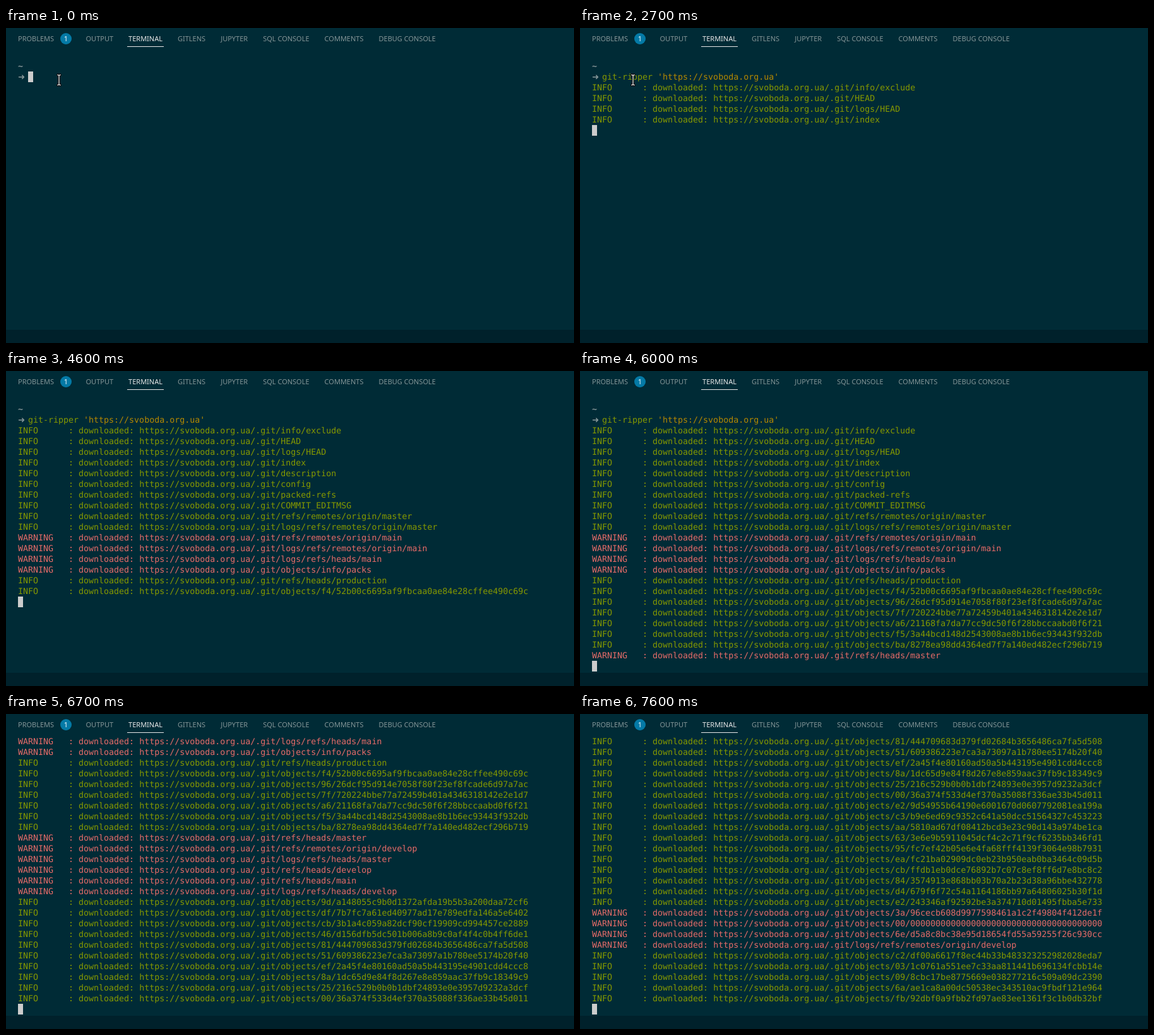
These frames come from a looping animation (900x500 px, 8000 ms). An HTML page:

```html
<!DOCTYPE html>
<html lang="en">
<head>
<meta charset="utf-8">
<title>Terminal</title>
<style>
html, body { margin: 0; width: 100%; height: 100%; overflow: hidden; background: #002b36; }
#stage { position: absolute; left: 0; top: 0; width: 900px; height: 500px; overflow: hidden; background: #002b36; }
#tabs { position: absolute; left: 19px; top: 7px; display: flex; gap: 24px; font: 11px/20px "Noto Sans", "Open Sans", sans-serif; color: #839496; white-space: nowrap; }
#tabs span:first-child { width: 83.5px; }
#tabs .on { color: #e7e7e7; }
#line { position: absolute; left: 192px; top: 29px; width: 58px; height: 1px; background: #e7e7e7; }
#badge { position: absolute; left: 86px; top: 8px; width: 18px; height: 18px; border-radius: 9px; background: #047aa6; color: #fff; font: 11px/18px "Noto Sans", sans-serif; text-align: center; }
#term { position: absolute; left: 19px; top: 35px; font: 13.3px/17px "DejaVu Sans Mono", "Noto Sans Mono", monospace; font-variant-ligatures: none; text-rendering: geometricPrecision; white-space: pre; }
.row { position: absolute; left: 0; top: 0; height: 17px; padding-top: 1px; }
.info { color: #859900; }
.warn { color: #e76b68; }
.str { color: #b58900; }
.hint { color: #859a9f; }
.dir { color: #839496; font-weight: bold; }
.arrow { display: inline-block; width: 16px; height: 17px; vertical-align: top; color: #839496; font-family: "DejaVu Sans", sans-serif; }
#caret { position: absolute; width: 8px; height: 17px; padding-top: 1px; box-sizing: border-box; background: #ccc; color: #002b36; }
#foot { position: absolute; left: 0; top: 479px; width: 900px; height: 21px; background: #00212b; }
#mouse { position: absolute; left: 78px; top: 72px; }
</style>
</head>
<body>
<div id="stage">
  <div id="tabs"><span>PROBLEMS</span><span>OUTPUT</span><span class="on">TERMINAL</span><span>GITLENS</span><span>JUPYTER</span><span>SQL CONSOLE</span><span>COMMENTS</span><span>DEBUG CONSOLE</span></div>
  <div id="badge">1</div>
  <div id="line"></div>
  <div id="term"></div>
  <div id="foot"></div>
  <svg id="mouse" width="12" height="21" fill="none" stroke-linecap="round">
    <defs><path id="beam" d="M3.5 2.5H5L6 3.5L7 2.5H8.5M6 3.5V17.5M3.5 18.5H5L6 17.5L7 18.5H8.5"/></defs>
    <use href="#beam" stroke="#000" stroke-width="3"/>
    <use href="#beam" stroke="#fff" stroke-width="1.2"/>
  </svg>
</div>
<script>
const LOOP = 8000, ROWS = 26, ROW_H = 17, CHAR_W = 8;
const SITE = 'https://svoboda.org.ua';

// Paths fetched from .git/; a leading "!" marks a warning.
const paths = `info/exclude
HEAD
logs/HEAD
index
description
config
packed-refs
COMMIT_EDITMSG
refs/remotes/origin/master
logs/refs/remotes/origin/master
!refs/remotes/origin/main
!logs/refs/remotes/origin/main
!logs/refs/heads/main
!objects/info/packs
refs/heads/production
f4/52b00c6695af9fbcaa0ae84e28cffee490c69c
96/26dcf95d914e7058f80f23ef8fcade6d97a7ac
7f/720224bbe77a72459b401a4346318142e2e1d7
a6/21168fa7da77cc9dc50f6f28bbccaabd0f6f21
f5/3a44bcd148d2543008ae8b1b6ec93443f932db
ba/8278ea98dd4364ed7f7a140ed482ecf296b719
!refs/heads/master
!refs/remotes/origin/develop
!logs/refs/heads/master
!refs/heads/develop
!refs/heads/main
!logs/refs/heads/develop
9d/a148055c9b0d1372afda19b5b3a200daa72cf6
df/7b7fc7a61ed40977ad17e789edfa146a5e6402
cb/3b1a4c059a82dcf90cf19909cd994457ce2889
46/d156dfb5dc501b006a8b9c0af4f4c0b4ff6de1
81/444709683d379fd02684b3656486ca7fa5d508
51/609386223e7ca3a73097a1b780ee5174b20f40
ef/2a45f4e80160ad50a5b443195e4901cdd4ccc8
8a/1dc65d9e84f8d267e8e859aac37fb9c18349c9
25/216c529b0b0b1dbf24893e0e3957d9232a3dcf
00/36a374f533d4ef370a35088f336ae33b45d011
e2/9d54955b64190e6001670d0607792081ea199a
c3/b9e6ed69c9352c641a50dcc51564327c453223
aa/5810ad67df08412bcd3e23c90d143a974be1ca
63/3e6e9b5911045dcf4c2c71f9cf6235bb346fd1
95/fc7ef42b05e6e4fa68fff4139f3064e98b7931
ea/fc21ba02909dc0eb23b950eab0ba3464c09d5b
cb/ffdb1eb0dce76892b7c07c8ef8ff6d7e8bc8c2
84/3574913e868bb03b70a2b23d38a96bbe432778
d4/679f6f72c54a1164186bb97a64806025b30f1d
e2/243346af92592be3a374710d01495fbba5e733
!3a/96cecb608d9977598461a1c2f49804f412de1f
!00/00000000000000000000000000000000000000
!6e/d5a8c8bc38e95d18654fd55a59255f26c930cc
!logs/refs/remotes/origin/develop
c2/df00a6617f8ec44b33b483323252982028eda7
03/1c0761a551ee7c33aa811441b696134fcbb14e
09/8cbc17be8775669e038277216c509a09dc2390
6a/ae1ca8a00dc50538ec343510ac9fbdf121e964
fb/92dbf0a9fbb2fd97ae83ee1361f3c1b0db32bf`.split('\n');

// [time, lines printed so far]
const steps = [
  [0, 0], [2400, 3], [2700, 4],
  [3400, 5], [3500, 6], [3600, 7], [3700, 8], [3800, 9], [3900, 10], [4000, 11], [4100, 12], [4200, 14],
  [4600, 16], [4700, 17], [4800, 18], [4900, 20], [5000, 21],
  [6000, 22], [6100, 23],
  [6300, 25], [6400, 27], [6500, 29], [6600, 33], [6700, 37], [6800, 41], [6900, 45], [7000, 49], [7100, 51],
  [7400, 53], [7500, 55], [7600, 56]
];

const span = (cls, text) => `<span class="${cls}">${text}</span>`;

function logLine(entry) {
  const warn = entry[0] === '!';
  let path = warn ? entry.slice(1) : entry;
  if (/^[0-9a-f]{2}\//.test(path)) path = 'objects/' + path;
  const level = (warn ? 'WARNING' : 'INFO').padEnd(10);
  return span(warn ? 'warn' : 'info', `${level}: downloaded: ${SITE}/.git/${path}`);
}

const log = paths.map(logLine);
const arrow = span('arrow', '➜');
const prompts = {
  empty: arrow,
  hint: arrow + span('info', 'g') + span('hint', `it-ripper '${SITE}'`),
  full: arrow + span('info', 'git-ripper ') + span('str', `'${SITE}'`)
};

const term = document.getElementById('term');
const mouse = document.getElementById('mouse');
const add = () => term.appendChild(document.createElement('div'));
const rows = Array.from({ length: ROWS }, (_, i) => {
  const row = add();
  row.className = 'row';
  row.style.top = i * ROW_H + 'px';
  return row;
});
const caret = add();
caret.id = 'caret';

function draw(t) {
  const count = steps.filter(s => s[0] <= t).pop()[1];
  const prompt = t < 300 ? 'empty' : t < 1200 ? 'hint' : 'full';
  const buffer = ['', span('dir', '~'), prompts[prompt], ...log.slice(0, count)];
  const entered = t >= 1800;
  const scroll = Math.max(0, buffer.length - ROWS + 1);
  rows.forEach((row, i) => { row.innerHTML = buffer[i + scroll] || ''; });

  const col = entered ? 0 : { empty: 2, hint: 3, full: 37 }[prompt];
  const line = entered ? buffer.length - scroll : 2;
  caret.style.left = col * CHAR_W + 'px';
  caret.style.top = line * ROW_H + 'px';
  caret.textContent = prompt === 'hint' ? 'i' : '';

  // The pointer accelerates up and out of the stage.
  const p = Math.min(1, Math.max(0, (t - 3300) / 700));
  mouse.style.transform = `translate(${Math.round(14 * p * p)}px, ${-Math.round(100 * p * p)}px)`;
}

const start = performance.now();
let last = -1;
function tick() {
  const t = Math.floor(((performance.now() - start) % LOOP) / 100) * 100;
  if (t !== last) draw(last = t);
  requestAnimationFrame(tick);
}
tick();
</script>
</body>
</html>
```
